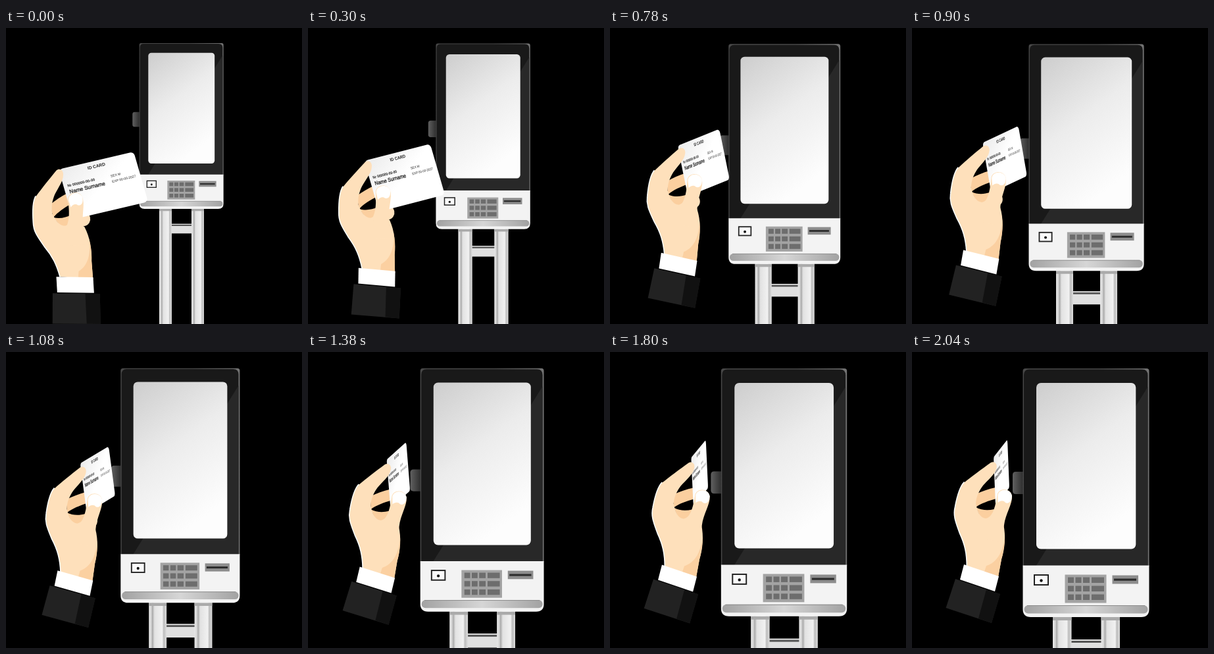
Write an HTML page that moves like this. It is 450x450 px and loops after 2820 ms.

```html
<!DOCTYPE html>
<html lang="en">
<head>
<meta charset="utf-8">
<title>ID card at a kiosk</title>
<style>
  html, body { margin: 0; width: 100%; height: 100%; overflow: hidden; background: #000; }
  svg { display: block; width: 100vw; height: 100vh; }
  text { font-family: "Liberation Sans", Arial, sans-serif; fill: #222; }
</style>
</head>
<body>
<svg viewBox="0 0 450 450">
  <defs>
    <linearGradient id="glass" x1="0" y1="0" x2=".45" y2="1">
      <stop offset="0" stop-color="#cdcdcd"/>
      <stop offset=".5" stop-color="#ececec"/>
      <stop offset="1" stop-color="#fdfdfd"/>
    </linearGradient>
    <linearGradient id="leg">
      <stop offset="0" stop-color="#e8e8e8"/>
      <stop offset=".14" stop-color="#d4d4d4"/>
      <stop offset=".2" stop-color="#a9a9a9"/>
      <stop offset=".32" stop-color="#e2e2e2"/>
      <stop offset=".75" stop-color="#f1f1f1"/>
      <stop offset=".84" stop-color="#bdbdbd"/>
      <stop offset="1" stop-color="#dedede"/>
    </linearGradient>
    <linearGradient id="lip">
      <stop offset="0" stop-color="#a2a2a2"/>
      <stop offset=".5" stop-color="#d6d6d6"/>
      <stop offset="1" stop-color="#a2a2a2"/>
    </linearGradient>
    <linearGradient id="rim">
      <stop offset=".6" stop-color="#484848"/>
      <stop offset="1" stop-color="#747474"/>
    </linearGradient>
    <linearGradient id="grip">
      <stop offset="0" stop-color="#606060"/>
      <stop offset="1" stop-color="#2e2e2e"/>
    </linearGradient>
    <linearGradient id="paper" x2="1" y2="1">
      <stop offset="0" stop-color="#ebebeb"/>
      <stop offset=".5" stop-color="#fff"/>
    </linearGradient>
  </defs>

  <g id="kiosk">
    <rect x="241" y="437" width="49" height="22" fill="#e0e0e0"/>
    <rect x="241" y="439" width="49" height="3" fill="#555"/>
    <rect x="214" y="398" width="28.500" height="290" fill="url(#leg)"/>
    <rect x="287.500" y="398" width="28.500" height="290" fill="url(#leg)"/>
    <path d="M214 403h28.500v5h-28.500zM287.500 403h28.500v5h-28.500z" fill="#aaa"/>
    <path d="M169 182h-11q-5 0-5 5v24q0 5 5 5h11z" fill="url(#grip)"/>
    <path d="M168.500 326V29q0-4 4-4h184q4 0 4 4v297z" fill="url(#rim)"/>
    <path d="M170 326V35q0-8.500 8-8.500h172q8.500 0 8.500 9v291z" fill="#191919"/>
    <path d="M188 326L358.500 53v273z" fill="#282828"/>
    <rect x="189" y="47" width="151.300" height="252.500" rx="7" fill="url(#glass)"/>
    <path d="M168.500 324.500h192v66.500q0 12-12 12h-168q-12 0-12-12z" fill="#f3f3f3"/>
    <rect x="170.500" y="385" width="188" height="12.500" rx="6" fill="url(#lip)"/>
    <path d="M175 385.500h179" stroke="#8c8c8c"/>
    <rect x="186" y="339" width="21" height="15" fill="#fafafa" stroke="#222" stroke-width="2"/>
    <circle cx="196.500" cy="347.500" r="2.200" fill="#111"/>
    <rect x="232.500" y="338.500" width="63" height="43" fill="#a3a3a3"/>
    <g id="keys" fill="#6d6d6d"></g>
    <rect x="304.500" y="339.500" width="39.500" height="13" fill="#8d8d8d"/>
    <rect x="307" y="344.500" width="34" height="3.200" fill="#2c2c2c"/>
  </g>

  <g id="fingers">
    <ellipse id="knuckle" cx="140" cy="250" rx="11" ry="11" fill="#fee0bb"/>
    <path d="M97 236L97 216C106 212 117 208 127 206L128 223C117 226 105 230 97 236Z" fill="#fbcf9f"/>
    <path d="M97 236C106 241 116 241 125 239L120 252 106 256Z" fill="#fbcf9f"/>
  </g>

  <g id="card">
    <rect width="117" height="78" rx="6" fill="url(#paper)"/>
    <text x="56.500" y="10.500" font-size="6.600" font-weight="700" text-anchor="middle">ID CARD</text>
    <text x="6" y="29" font-size="5.600" font-weight="700">Nr 000000-00-00</text>
    <text x="6.500" y="39" font-size="7.900" stroke="#222" stroke-width=".3">Name Surname</text>
    <text x="73" y="29.500" font-size="5">SEX M</text>
    <text x="73" y="38" font-size="5">EXP 00-00-2027</text>
  </g>

  <g id="palm">
    <path d="M84 326C84 306 81 292 73 275 67 258 63 249 66 236 69 220 73 205 80 198" fill="none" stroke="#fff" stroke-width="3"/>
    <path d="M84 326C84 306 81 292 73 275 67 258 63 249 66 236 69 220 73 205 80 198 91 189 106 178 120 168 126 165 131 171 128 178 126 186 115 195 108 203 102 211 98 219 97 230 99 242 103 252 112 253 118 252 120 248 122 245L139 262C143 280 141 300 136 315L131 342Z" fill="#fee0bb"/>
    <path d="M141 280C139 302 130 320 113 325L110 334 131 342 136 315C139 305 141 292 141 280Z" fill="#fbd0a1"/>
  </g>

  <g id="thumb">
    <path d="M118 252C126 241 128 226 129.500 218 131 206 150 206 152 219 153 231 142 246 140 263L136 290 112 284Z" fill="#fee0bb"/>
    <path d="M130.500 218C132 207 150 207 152 219 151 229 146 231 142 229 139 225 134 226 130.500 229Z" fill="#fff"/>
  </g>

  <g id="sleeve">
    <path d="M79 323L132 341 126 364 73 346Z" fill="#fff"/>
    <path d="M66 345L134 368 121 412 51.500 389Z" fill="#222"/>
    <path d="M113 361L134 368 121 412 101 405Z" fill="#111"/>
  </g>
</svg>
<script>
  const LOOP = 2820, STEP = 60, END = 2040;
  const HELD = [360, 1440, 1860]; // ticks that repeat the previous pose
  const TIMES = [0, 300, 780, 1080, 1380, 1800, 2040];
  const TRAVEL = [0, 0.24, 0.655, 0.83, 0.935, 0.99, 1];
  const part = id => document.getElementById(id);
  const place = (id, transform) => part(id).setAttribute("transform", transform);

  for (const y of [342.5, 355.5, 368.5])
    for (const [x, w] of [[237, 9], [248.5, 9], [260, 10], [273, 19]]) {
      const key = document.createElementNS("http://www.w3.org/2000/svg", "rect");
      Object.entries({ x, y, width: w, height: 8.5 }).forEach(([k, v]) => key.setAttribute(k, v));
      part("keys").append(key);
    }

  function slope(i) {
    const a = Math.max(i - 1, 0), b = Math.min(i + 1, TIMES.length - 1);
    return b === i ? 0 : (TRAVEL[b] - TRAVEL[a]) / (TIMES[b] - TIMES[a]);
  }

  // Smooth curve through the travel table
  function travel(t) {
    if (t >= END) return 1;
    const i = TIMES.findIndex(end => end > t) - 1;
    const h = TIMES[i + 1] - TIMES[i], u = (t - TIMES[i]) / h;
    const v = u * u * (3 - 2 * u);
    return TRAVEL[i] * (1 - v) + TRAVEL[i + 1] * v
      + h * u * (1 - u) * (slope(i) * (1 - u) - slope(i + 1) * u);
  }

  function pose(p) {
    const q = 1 - p, scale = (1 + p / 2) / 1.5;
    place("kiosk", `translate(${264.3 + 2.2 * q} ${25 - 2 * q}) scale(${scale}) translate(-264.3 -25)`);

    // The wrist turns a little further than the hand
    const turn = (id, angle) =>
      place(id, `translate(${2.5 * q} ${47 * q}) rotate(${-angle * q} 102.5 343)`);
    turn("fingers", 15);
    turn("palm", 15);
    turn("thumb", 17);
    turn("sleeve", 18);
    place("knuckle", `translate(${-10 * p} 0)`);

    const bend = (from, a, b) => from + a * p + b * p * p;
    const left = bend(80, 17, 27), top = bend(215, -55, 0);
    const right = bend(194, -30, -19), rise = bend(188, -48, -7);
    const footX = bend(102, 25, 0), footY = bend(291, -46, -12);
    const m = [(right - left) / 117, (rise - top) / 117, (footX - left) / 78, (footY - top) / 78, left, top];
    place("card", `matrix(${m.join(" ")})`);
  }

  const start = performance.now();
  function draw() {
    const t = (performance.now() - start) % LOOP;
    let tick = Math.floor(t / STEP) * STEP;
    if (HELD.includes(tick)) tick -= STEP;
    pose(travel(tick));
    requestAnimationFrame(draw);
  }
  draw();
</script>
</body>
</html>
```
